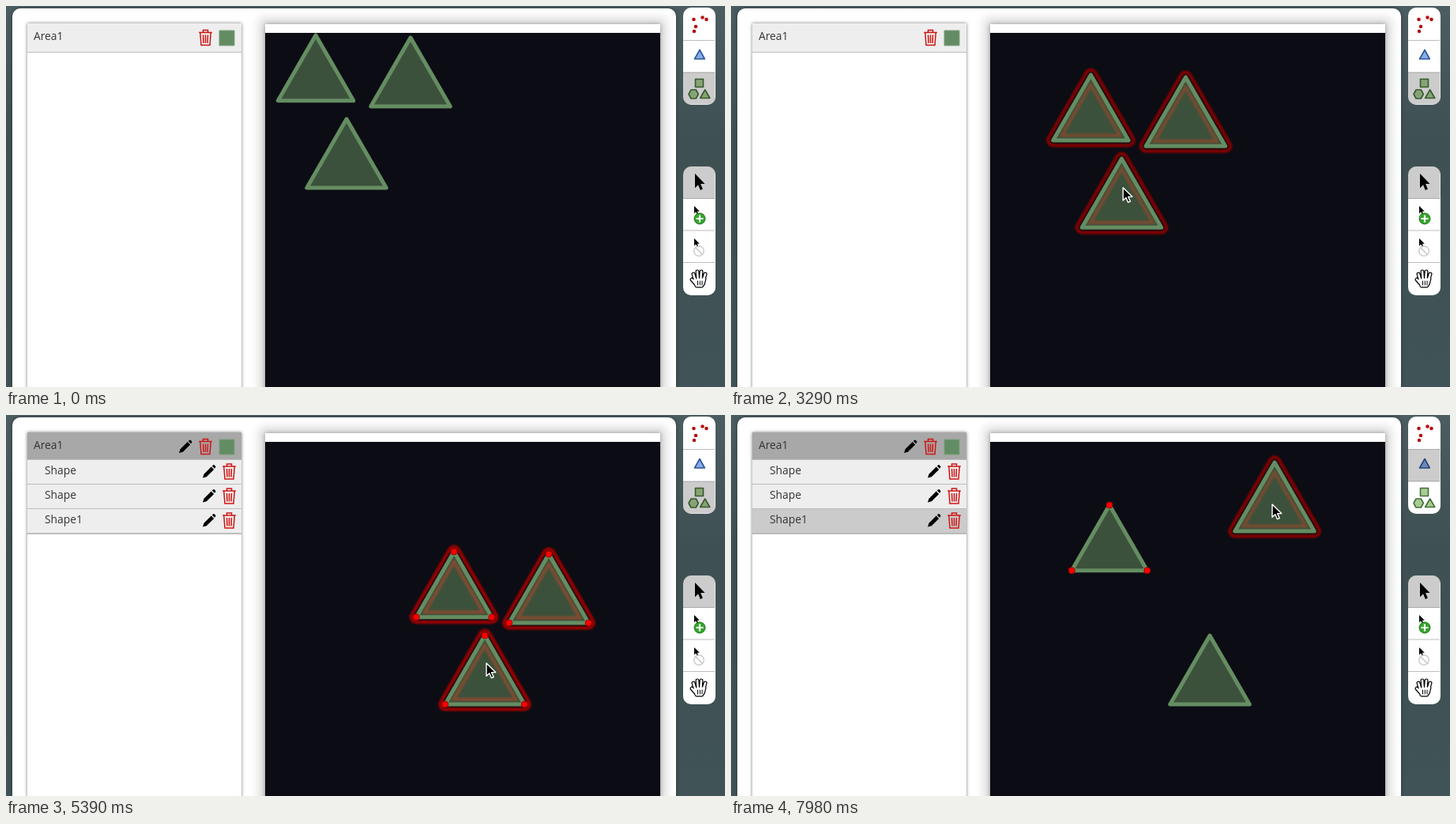
An HTML page that plays this animation: 910 px wide and 482 px high, repeating every 8 s.

```html
<!DOCTYPE html>
<html lang="en">
<head>
<meta charset="utf-8">
<title>Area editor</title>
<style>
html, body { margin: 0; width: 100%; height: 100%; overflow: hidden; }
body { position: relative; background: linear-gradient(#4b5d61, #3f5053 35%, #405356); }
div, svg { position: absolute; }
.page { left: 7.5px; top: 2.5px; width: 840.5px; height: 520px; border-radius: 10px; background: #fff; box-shadow: 0 0 4px #2c3a3d; }
.list { left: 27px; top: 22px; width: 271px; height: 480px; background: #fff; box-shadow: 0 0 4px #777; }
.card { left: 327.5px; top: 22.5px; width: 500px; height: 480px; background: linear-gradient(#fff 11px, #0c0d14 11px); box-shadow: 0 0 12px 7px rgba(0,0,0,.16), 0 0 5px rgba(0,0,0,.3); }
.bar { left: 857px; width: 40.5px; background: #fff; border-radius: 10px; }
svg { left: 0; top: 0; }
text { font: 13.8px "Open Sans", "Noto Sans", sans-serif; fill: #333; }
.glow { fill: none; stroke-linejoin: round; }
.red { stroke-width: 17; filter: blur(1.3px); }
.gap { stroke: #0c0d14; stroke-width: 8.5; filter: blur(.8px); }
.tri { fill: rgba(104,145,94,.52); stroke: #658d62; stroke-width: 5; stroke-linejoin: round; }
.dot { fill: #f00; stroke: #a00000; }
.lines { stroke: #bdbdbd; }
.green { fill: #a8cc92; stroke: #446f38; stroke-width: 1.6; stroke-linejoin: round; }
.shade { opacity: .2; }
</style>
</head>
<body>
<div class="page"></div>
<div class="list"></div>
<div class="card"></div>
<div class="bar" style="top:2px;height:122.5px"></div>
<div class="bar" style="top:203px;height:162.5px"></div>
<svg width="910" height="482">
  <defs>
    <path id="trash" fill="none" stroke="#cf1414" stroke-width="1.5" d="M-8.3 -6.5H8.3M-3 -7V-9.5H3V-7M-6.7 -6L-5.5 9.5H5.5L6.7 -6M-3 -3.5L-2.5 7M0 -3.5V7M3 -3.5L2.5 7"/>
    <path id="pencil" d="M-8 8L-6.5 3.2 2.8 -6 6.2 -2.6 -3.2 6.7ZM3.8 -7L5 -8.1Q6 -8.8 7 -7.9L8 -6.8Q8.8 -5.8 8 -4.9L7 -3.7Z"/>
    <path id="arrow" d="M0 0V16.2L3.8 12.7 6.4 18.7 9.2 17.5 6.6 11.6H11.7Z"/>
  </defs>

  <g id="closed">
    <path fill="#eee" d="M27 22H298V58.5H27Z"/>
    <path class="lines" d="M27 58.5H298"/>
  </g>
  <g id="open">
    <path fill="#eee" d="M27 56H298V149.5H27Z"/>
    <path fill="#a8a8a8" d="M27 22H298V56H27Z"/>
    <path id="picked" fill="#cbcbcb" d="M27 118.5H298V149.5H27Z"/>
    <path stroke="#aaa" stroke-width="1.5" d="M27 150H298"/>
    <use href="#pencil" x="227" y="40"/>
    <g id="rows"></g>
  </g>
  <text x="35" y="43">Area1</text>
  <use href="#trash" x="252.5" y="40"/>
  <path fill="#648c64" stroke="#7c9f7c" d="M270 31H289V50H270Z"/>

  <g id="shapes"></g>

  <path class="lines" d="M857 43.5h40M857 84h40M857 243.5h40M857 284h40M857 324.5h40"/>
  <path stroke="#b30f0f" stroke-width="4.6" stroke-linecap="round" d="M870.5 17h0M881.5 14.5h0M886.5 17h0M873 26h0M871 32h0"/>
  <path fill="#86aee5" stroke="#2c549b" stroke-width="1.6" stroke-linejoin="round" d="M878 55.5L884.3 67H871.5Z"/>
  <path class="green" d="M872.5 92.5h10v10h-10ZM864 111.5l3 -5.5h6.3l3 5.5 -3 5.5H867ZM884.7 106l6.1 10.5H878.6Z"/>
  <path id="pick2" class="shade" d="M857 43.5h40.5V84h-40.5Z"/>
  <path id="pick3" class="shade" d="M857 84h40.5v30.5q0 10 -10 10h-20.5q-10 0 -10 -10Z"/>
  <path class="shade" d="M857 243.5v-30.5q0 -10 10 -10h20.5q10 0 10 10v30.5Z"/>
  <use href="#arrow" transform="translate(872 212) scale(1.07 1.12)"/>
  <use href="#arrow" transform="translate(871 253) scale(.58)"/>
  <circle cx="878" cy="269" r="7" fill="#35a52c" stroke="#1d7a18"/>
  <path stroke="#fff" stroke-width="2.2" d="M873.5 269h9M878 264.5v9"/>
  <use href="#arrow" transform="translate(871 294) scale(.58)"/>
  <path fill="none" stroke="#ccc" stroke-width="1.5" d="M870.7 310a6.3 6.3 0 1 1 12.6 0a6.3 6.3 0 1 1 -12.6 0M872.6 305.6l8.8 8.8"/>
  <g id="hand" fill="#fff" stroke-linecap="round" stroke-linejoin="round"></g>

  <g id="cursor">
    <g id="ring" fill="none">
      <circle cy="1" r="21.5" stroke="#000" stroke-width="3.6"/>
      <circle cy="1" r="21.5" stroke="#ddd" stroke-width="1.2"/>
    </g>
    <use href="#arrow" stroke="#fff" stroke-width="1.4" stroke-linejoin="round"/>
  </g>
</svg>
<script>
const LOOP = 8000, STEP = 70, HOLD = 280;
const OPEN = 3500, TOOL = 6090, GRAB = 6510;

const $ = id => document.getElementById(id);
const show = (el, on) => { el.style.display = on ? "" : "none"; };
const move = (el, x, y) => el.setAttribute("transform", `translate(${x} ${y})`);
const clamp = (v, a, b) => Math.min(b, Math.max(a, v));
const within = (t, a, b) => t >= a && t < b;
const easeOut = p => p * (2 - p);

// Cursor moves: start, duration, end point
const moves = [
  [0, 350, 527, 279], [700, 700, 438, 192], [1960, 630, 433, 178],
  [2660, 210, 499, 211], [2870, 560, 496, 231],
  [3710, 70, 603, 244], [3780, 140, 570, 286], [3920, 420, 456, 342],
  [4970, 350, 608, 314], [5740, 280, 876, 62], [TOOL, 280, 578, 229],
  [GRAB, 350, 490, 170], [7000, 280, 684, 229], [7560, 350, 685, 113]
];
const presses = [1540, 2660, 3710, 4830, GRAB, 7490];

function cursorAt(t) {
  let x = 600, y = 352;
  for (const [start, span, toX, toY] of moves) {
    const p = easeOut(clamp((t - start) / span, 0, 1));
    x += (toX - x) * p;
    y += (toY - y) * p;
  }
  return [x, y];
}

// A dragged shape trails the cursor by one step.
function dragged(t, from, to) {
  const [x0, y0] = cursorAt(from);
  const [x, y] = cursorAt(clamp(t - STEP, from, to));
  return [x - x0, y - y0];
}

// Equilateral triangles: apex, side, own drag
const shapes = [
  { x: 392, y: 37, side: 95.5, drag: [GRAB, 7000] },
  { x: 512, y: 40, side: 100.5, drag: [7560, LOOP] },
  { x: 431, y: 143, side: 100.5, drag: [0, 0] }
];

for (const s of shapes) {
  const base = s.y + s.side * Math.sqrt(3) / 2;
  const pts = [[s.x, s.y], [s.x - s.side / 2, base], [s.x + s.side / 2, base]];
  const poly = name => `<polygon class="${name}" points="${pts.join(" ")}"/>`;
  const dot = ([x, y]) => `<circle class="dot" cx="${x}" cy="${y}" r="4"/>`;
  s.el = document.createElementNS("http://www.w3.org/2000/svg", "g");
  s.el.innerHTML = `<g>${poly("glow red")}${poly("glow gap")}</g>${poly("tri")}<g>${pts.map(dot).join("")}</g>`;
  $("shapes").append(s.el);
  [s.glow, s.tri, s.dots] = s.el.children;
}

$("rows").innerHTML = ["Shape", "Shape", "Shape1"].map((name, i) => `
  <g transform="translate(0 ${31 * i})">
    <path class="lines" d="M27 56.5H298"/>
    <text x="49" y="75">${name}</text>
    <use href="#pencil" x="257" y="71.5"/>
    <use href="#trash" x="282.5" y="71.5"/>
  </g>`).join("");

// Four fanned fingers, a thumb and a palm, black under white
const fingers = [-1.5, -.5, .5, 1.5].map(k =>
  `M${877.5 + 3.6 * k} 346L${877.5 + 5 * k} ${335.5 + 1.6 * k * k}`).join("");
const hand = fingers + "M872 350.5L868 346M871.5 347L884 345 882.5 351 880.5 354H874Z";
$("hand").innerHTML = `
  <path stroke="#000" stroke-width="5" d="${hand}"/>
  <path stroke="#fff" stroke-width="2.6" d="${hand}"/>
  <path stroke="#000" d="M875.5 348v5M878.3 348v5M881 348v5"/>`;

function hovered(i, t) {
  if (t < TOOL) return within(t, 2030, 5950);
  return i === 0 ? within(t, 6370, 7100) : i === 1 && t >= 7210;
}

function draw(t) {
  const [gx, gy] = dragged(t, 2660, 5390);
  shapes.forEach((s, i) => {
    const [x, y] = dragged(t, ...s.drag);
    const dots = t >= OPEN && (i === 0 || t < GRAB);
    move(s.el, gx + x, gy + y);
    show(s.glow, hovered(i, t));
    show(s.dots, dots);
    s.glow.firstChild.style.stroke = dots ? "#9c0000" : "#850000";
  });

  show($("closed"), t < OPEN);
  show($("open"), t >= OPEN);
  show($("picked"), t >= 7000);
  show($("pick2"), t >= TOOL);
  show($("pick3"), t < TOOL);

  show($("cursor"), t > 0);
  show($("ring"), presses.some(p => within(t, p, p + HOLD)));
  move($("cursor"), ...cursorAt(t));
}

function tick() {
  const t = performance.now() % LOOP;
  draw(Math.floor(t / STEP) * STEP);
  requestAnimationFrame(tick);
}
tick();
</script>
</body>
</html>
```
